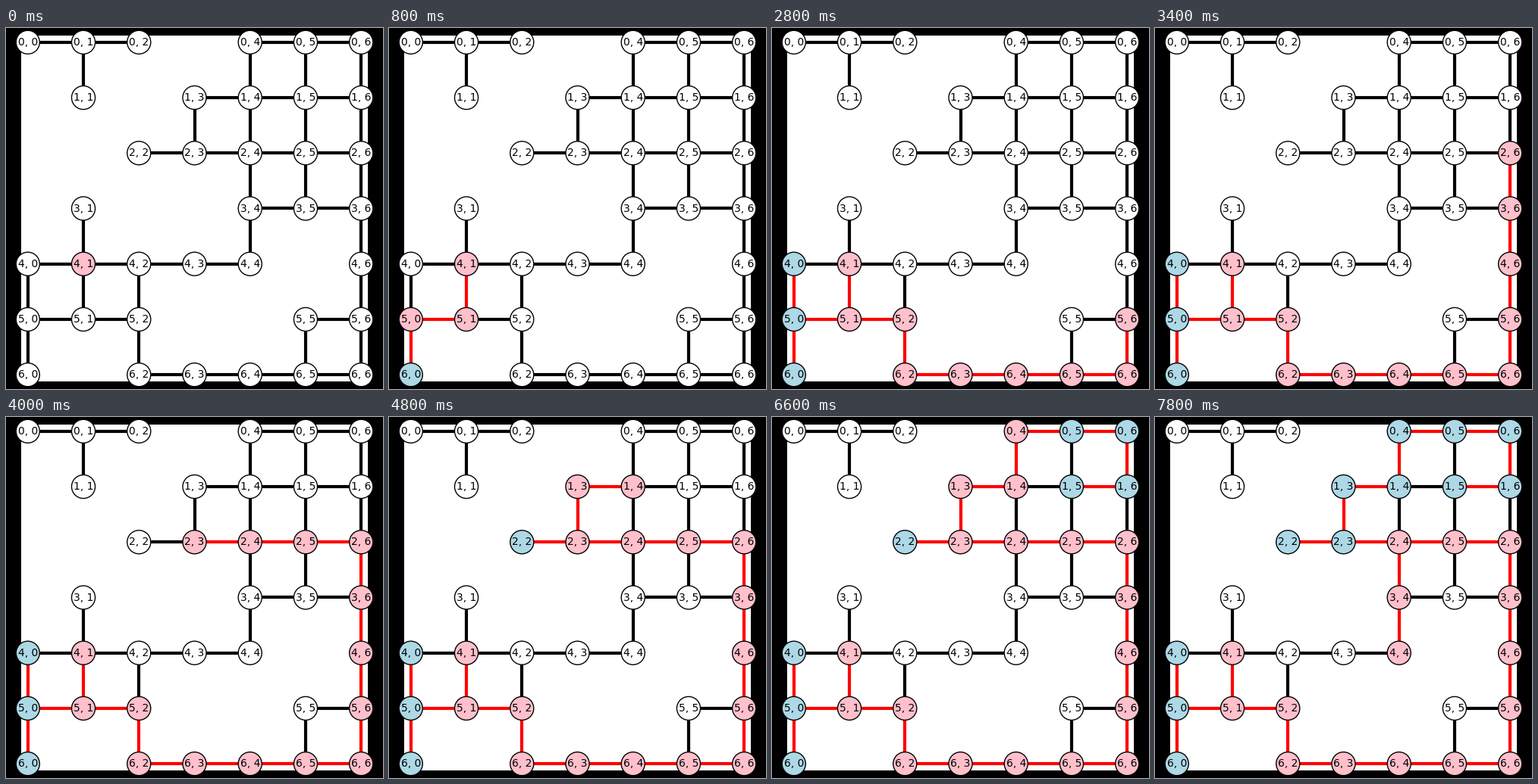
A matplotlib script for the animation above (8 s loop, 497 by 477 pixels).

```python
import matplotlib.pyplot as plt
from matplotlib.animation import FuncAnimation
from matplotlib.collections import LineCollection

W, H, DPI = 497, 477, 100
ROWS = [
    "###.###",
    ".#.####",
    "..#####",
    ".#..###",
    "#####.#",
    "###..##",
    "#.#####",
]
# Depth-first walk: a cell is entered, "-" steps back out of the current one.
WALK = ("41 51 50 60 - 40 - - 52 62 63 64 65 66 56 46 36 26 25 24 23 22 - "
        "13 14 04 05 06 16 15 - - - - - - - - 34 44").split()

nodes = [(r, c) for r, row in enumerate(ROWS)
         for c, mark in enumerate(row) if mark == "#"]
edges = [(a, b) for a in nodes
         for b in ((a[0], a[1] + 1), (a[0] + 1, a[1])) if b in nodes]


def explore(count):
    """Return the open path, the finished cells and the edges used."""
    path, done, used = [], set(), set()
    for move in WALK[:count]:
        if move == "-":
            done.add(path.pop())
            continue
        cell = (int(move[0]), int(move[1]))
        if path:
            used.add(frozenset((path[-1], cell)))
        path.append(cell)
    return path, done, used


def segment(edge):
    return [(c, r) for r, c in edge]


# The tiny surplus keeps the pixel size from rounding down.
fig = plt.figure(figsize=((W + 1e-4) / DPI, (H + 1e-4) / DPI), dpi=DPI,
                 facecolor="black")
ax = fig.add_axes([20 / W, 10 / H, 457 / W, 457 / H], facecolor="white")
ax.set(xlim=(-0.12, 6.12), ylim=(6.12, -0.12), xticks=[], yticks=[])
for spine in ax.spines.values():
    spine.set_visible(False)

lines = LineCollection([segment(e) for e in edges], linewidths=3,
                       colors="black", zorder=1, clip_on=False)
ax.add_collection(lines, autolim=False)
dots = ax.scatter([c for r, c in nodes], [r for r, c in nodes], s=500,
                  c="white", edgecolors="black", linewidths=1,
                  zorder=2, clip_on=False)
for r, c in nodes:
    ax.text(c, r, f"{r}, {c}", family="DejaVu Sans", size=10,
            ha="center", va="center", zorder=3)


def update(frame):
    path, done, used = explore(frame + 1)
    dots.set_facecolor(["pink" if n in path else
                        "lightblue" if n in done else "white" for n in nodes])
    lines.set_color(["red" if frozenset(e) in used else "black"
                     for e in edges])
    return lines, dots


anim = FuncAnimation(fig, update, frames=len(WALK), interval=200,
                     repeat=True, repeat_delay=0, blit=False)
plt.show()
```
